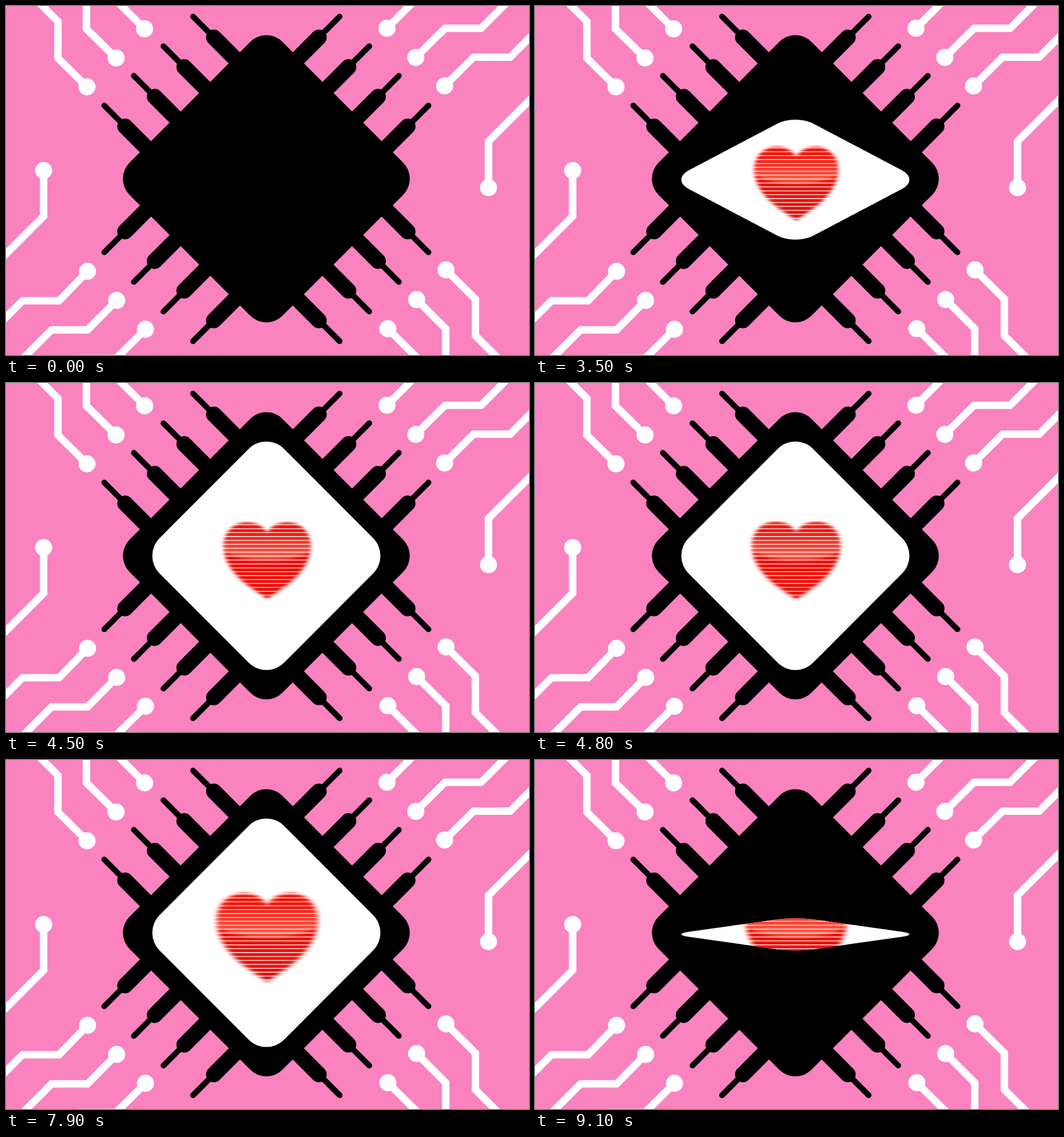
Write an HTML page that moves like this. It is 917x611 px and loops after 9.2 s.

```html
<!DOCTYPE html>
<html lang="en">
<head>
<meta charset="utf-8">
<title>Chip heart</title>
<style>
html, body { margin: 0; width: 100%; height: 100%; overflow: hidden; background: #fa82bf; }
svg { display: block; width: 917px; height: 611px; }
</style>
</head>
<body>
<svg viewBox="0 0 917 611" xmlns="http://www.w3.org/2000/svg">
  <defs>
    <clipPath id="lid"><rect class="eye" x="-154.3" y="-154.3" width="308.6" height="308.6" rx="44"/></clipPath>
    <path id="shape" d="M0-57C-9-72-24-78-41-78C-70-78-89-57-89-30C-89 5-63 34-36 53C-22 63-10 71 0 78C10 71 22 63 36 53C63 34 89 5 89-30C89-57 70-78 41-78C24-78 9-72 0-57Z"/>
    <clipPath id="inHeart"><use href="#shape"/></clipPath>
    <linearGradient id="red" x1="0" y1="0" x2="0" y2="1">
      <stop offset="0" stop-color="#ee1a10"/>
      <stop offset=".3" stop-color="#f5120a"/>
      <stop offset="1" stop-color="#ea0f0a"/>
    </linearGradient>
    <linearGradient id="shine" x1="0" y1="0" x2="0" y2="1">
      <stop offset=".2" stop-color="#ff6a54" stop-opacity="0"/>
      <stop offset=".85" stop-color="#ff6a54" stop-opacity=".85"/>
      <stop offset="1" stop-color="#ff6a54" stop-opacity=".6"/>
    </linearGradient>
    <filter id="soft" x="-.15" y="-.15" width="1.3" height="1.3" color-interpolation-filters="sRGB">
      <feGaussianBlur stdDeviation="4 2.6"/>
    </filter>
    <g id="pins" stroke-linecap="round"></g>
  </defs>

  <rect width="917" height="611" fill="#fa82bf"/>
  <g id="traces" fill="none" stroke="#fff" stroke-width="13"></g>

  <g stroke="#000">
    <use href="#pins"/>
    <use href="#pins" transform="matrix(-1 0 0 1 913 0)"/>
    <use href="#pins" transform="matrix(1 0 0 -1 0 605.4)"/>
    <use href="#pins" transform="matrix(-1 0 0 -1 913 605.4)"/>
  </g>
  <rect x="-189.5" y="-189.5" width="379" height="379" rx="39.8" transform="translate(456.5 302.5) rotate(45)"/>

  <g id="screen">
    <rect class="eye" x="-154.3" y="-154.3" width="308.6" height="308.6" rx="44" fill="#fff"/>
    <g clip-path="url(#lid)">
      <g id="heart">
        <g filter="url(#soft)">
          <use href="#shape" fill="url(#red)"/>
          <g clip-path="url(#inHeart)"><ellipse cy="-36" rx="100" ry="36" fill="url(#shine)"/></g>
        </g>
      </g>
      <path id="lines" stroke="#fff" stroke-width="1.3"/>
    </g>
  </g>
</svg>
<script>
const $ = id => document.getElementById(id);

// Each trace starts at its round pad.
const traces = [
  '142 141.5L91 91V27L54-10', '193 91L141 40V-10', '243 40L193-10',
  '668 39L717-10', '718.5 90L770 39H833L882-10', '769 140L820 89.5H884L927 46.5',
  '846 318V237L927 156', '66 288V368L-10 444',
  '143 464.5L93 516H29L-10 555', '194 515.5L143 567H80L26 621',
  '244.5 566L193 617H130L120 627',
  '771.5 462L823 513V577L867 621', '720 514L771 565V621', '669.5 565L726 621'
];
$('traces').innerHTML = traces.map(d => {
  const [x, y] = d.match(/[\d.]+/g);
  return `<path d="M${d}"/><circle cx="${x}" cy="${y}" r="15" fill="#fff" stroke="none"/>`;
}).join('');

let pins = '';
for (let i = 0; i < 4; i++) {
  const o = i * 51.9;
  pins += `<g transform="translate(${-o} ${o})"><path stroke-width="10" d="M328 18.5l40 40"/>` +
    '<path stroke-width="27.6" d="M364.5 55l50 50"/></g>';
}
$('pins').innerHTML = pins;

let rows = '';
for (let i = -11; i <= 13; i++) rows += `M340 ${(303 + i * 6.85).toFixed(2)}h236`;
$('lines').setAttribute('d', rows);

const LOOP = 9200;
const eyes = document.querySelectorAll('.eye');
const clamp = v => Math.max(0, Math.min(1, v));

function draw(ms) {
  const t = Math.floor(ms % LOOP / 100) * 100;
  const open = 20 + .38 * (t - 3000);
  const close = 19 + .371 * (LOOP - t);
  const h = Math.min(open, close, 400);
  const cy = 305.5 - 3 * (h - 20) / 380;
  $('screen').style.display = t < 3000 ? 'none' : '';
  eyes.forEach(e => e.setAttribute('transform',
    `translate(456.5 ${cy}) scale(1 ${Math.max(h, 1) / 400}) rotate(45)`));

  const grow = (1 - Math.cos(Math.PI * clamp((t - 3000) / 5000))) / 2;
  $('heart').setAttribute('transform', `translate(458 311) scale(${.825 + .175 * grow})`);
}

const start = performance.now();
function tick() {
  draw(performance.now() - start);
  requestAnimationFrame(tick);
}
tick();
</script>
</body>
</html>
```
